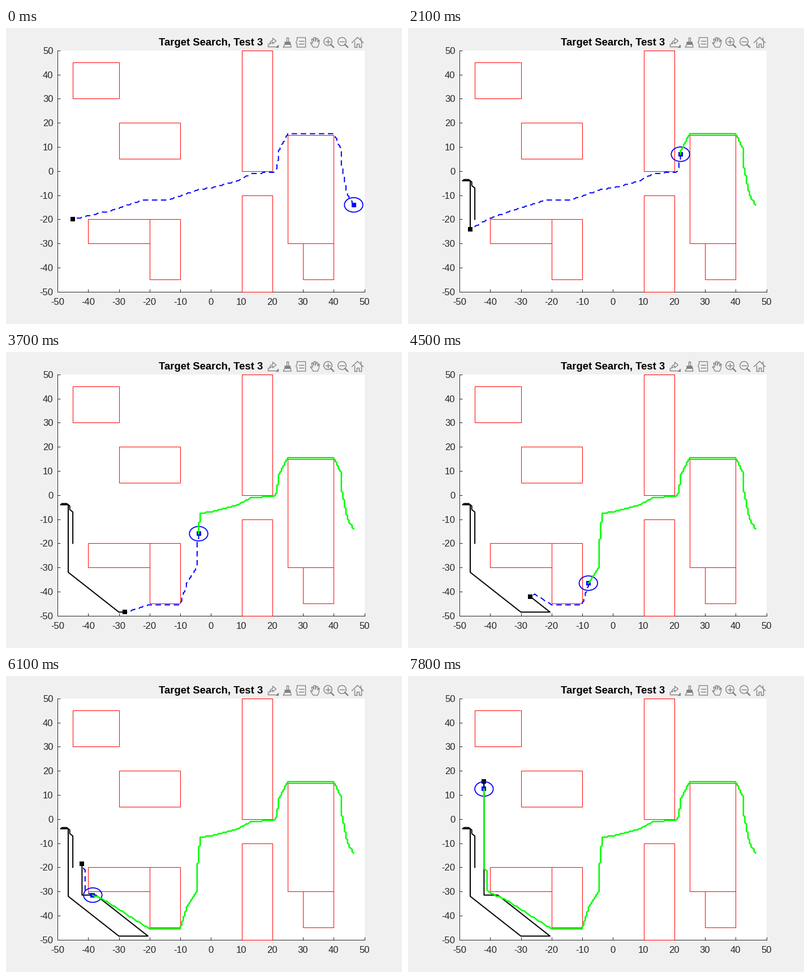
Write a matplotlib script that moves like this. It is 700x525 px and loops after 8.8 s.

```python
import numpy as np
import matplotlib.pyplot as plt
from matplotlib.animation import FuncAnimation
from matplotlib.patches import Circle, Ellipse, Polygon, Rectangle

W, H, DPI = 700, 525, 100
PX = 72 / DPI
FRAMES, LAST = 88, 78
CELL = 0.5
INK, GREY = "#262626", "#808080"

plt.rcParams.update({
    "font.family": "Liberation Sans",
    "font.size": 12,
    "axes.unicode_minus": False,
})

# Obstacles: x, y, width, height
WALLS = [(-45, 30, 15, 15), (-30, 5, 20, 15), (10, 0, 10, 50),
         (10, -50, 10, 40), (25, -30, 15, 45), (30, -45, 10, 15),
         (-40, -30, 20, 10), (-20, -45, 10, 25)]

# Turning points of the pursuer: over the block, through the gap,
# down to the floor and back up the left side
OVER = [(46.5, -14), (44.5, -10), (42.5, 3), (42.5, 9), (40, 15.5),
        (25, 15.5), (22, 8), (21.5, 1)]
GAP = [(20.5, -0.5), (13, -1), (9, -4), (0, -7), (-3.5, -7.5)]
DOWN = [(-4.5, -22), (-4.5, -29.5), (-8, -37), (-10, -45.5), (-20, -45.5)]
BACK = [(-35.5, -33), (-39.5, -31), (-41, -29.5), (-41, -21.5),
        (-42, -20.5), (-42, 12.5)]

# Way on from the gap, as long as the evader is in the west
WEST = [(-14, -12), (-22, -12), (-33, -16.5)]

FLEE = [(-45, -20), (-45, -7), (-46, -6), (-46, -4.5), (-47, -3.5),
        (-48.5, -3.5), (-49, -4), (-46.5, -4), (-46.5, -32), (-30, -48.5),
        (-20.5, -48.5), (-37.5, -31.5), (-42, -31.5), (-42, 15.5)]


def walk(keys):
    """Grid cells along the legs between keys, and the cost to each cell."""
    cells, costs = [np.array(keys[0], float)], [0.0]
    for a, b in zip(keys, keys[1:]):
        delta = np.subtract(b, a)
        low, high = sorted(abs(delta))
        n = max(1, int(np.ceil(high / CELL)))
        start = costs[-1]
        for t in np.arange(1, n + 1) / n:
            cells.append(np.round((a + t * delta) / CELL) * CELL)
            costs.append(start + t * (high + low / 3))
    return np.array(cells), np.array(costs)


class Track:
    """A grid walk at constant pace, finished at the last step."""

    def __init__(self, keys):
        self.cells, self.costs = walk(keys)

    def split(self, step):
        spent = self.costs[-1] * step / LAST
        i = np.argmin(abs(self.costs - spent))
        return self.cells[i], self.cells[:i + 1], self.cells[i + 1:]


hunter = Track(OVER + GAP + DOWN + BACK)
runner = Track(FLEE)


def west_plan(pos, ahead, goal):
    """Through the gap, bent upwards the higher the evader is."""
    gx, gy = goal
    rise = max(0, gy + 20)
    near = [p for p in ahead if p[0] > 20.5]
    far = [(x, y + rise * ((20.5 - x) / 66) ** 1.5)
           for x, y in GAP + WEST if x < pos[0]]
    corners = [(-20, (-40, -19.5)), (-24, (-41, -21)), (-35, (-41, -29.5))]
    return near + far + [c for limit, c in corners if gy < limit]


def south_plan(ahead, goal):
    """Along the route until level with the evader."""
    gx, gy = goal
    return [p for p in ahead
            if p[0] >= -20 or (p[0] > gx + 0.5 and p[1] < gy + 1.5)]


def plan(step, pos, ahead, goal):
    mid = west_plan(pos, ahead, goal) if step < 33 else south_plan(ahead, goal)
    return walk([pos, *mid, goal])[0]


fig = plt.figure(figsize=(W / DPI, H / DPI), dpi=DPI, facecolor="#f0f0f0")
ax = fig.add_axes([0.13, 57.25 / H, 0.775, 0.815])
ax.set(xlim=(-50, 50), ylim=(-50, 50))
ticks = range(-50, 51, 10)
ax.set_xticks(ticks)
ax.set_yticks(ticks)
ax.tick_params(direction="in", length=5 * PX, width=PX, color=INK,
               labelcolor=INK)
ax.tick_params(axis="x", pad=11.5 * PX)
ax.tick_params(axis="y", pad=7.5 * PX)
for side, spine in ax.spines.items():
    spine.set(visible=side in ("left", "bottom"), color=INK, linewidth=PX,
              zorder=1)

for x, y, w, h in WALLS:
    ax.add_patch(Rectangle((x, y), w, h, fill=False, ec="red", lw=PX,
                           zorder=3, clip_on=False))


def line(color, px, z, **kw):
    return ax.plot([], [], color=color, lw=px * PX, zorder=z, **kw)[0]


def square(color, z):
    return line(color, 0, z, marker="s", ms=8 * PX, mew=0)


way = line("blue", 2, 4, ls=(0, (4.8, 3.2)), dash_capstyle="butt")
fled = line("black", 2, 5)
prey = square("black", 6)
chaser = square("blue", 7)
ring = ax.add_patch(Ellipse((0, 0), 6, 6, fill=False, ec="blue",
                            lw=1.8 * PX, zorder=7))
chased = line("lime", 2.6, 8)

# Title and toolbar, in stage pixels
top = fig.add_axes([0, 0, 1, 1])
top.set(xlim=(0, W), ylim=(H, 0))
top.axis("off")
top.text(362.5, 31, "Target Search, Test 3", ha="center", va="baseline",
         weight="bold", size=13.35, color="black")


def stroke(x, *pts, px=1.4):
    xs, ys = np.array(pts).T
    top.plot(xs + x, ys + 25, color=GREY, lw=px * PX,
             solid_joinstyle="round")


def shape(x, *pts, fill=False):
    top.add_patch(Polygon(np.add(pts, (x, 25)), fc=GREY if fill else "none",
                          ec=GREY, lw=1.3 * PX, joinstyle="round"))


def export(x):
    stroke(x, (-9, 3), (-9, 8), (4, 8))
    shape(x, (-6, 4), (-4, -1), (0, -3), (0, -7), (6, -2), (0, 3), (0, 0))
    shape(x, (9, 5), (9, 9), (5, 9), fill=True)


def brush(x):
    shape(x, (-1, -8), (2, -8), (2, 0), (-1, 0))
    shape(x, (-4, 0), (5, 0), (6, 4), (-4, 4), fill=True)
    shape(x, (-4, 4), (-7, 9), (7, 9), (6, 4))


def tip(x):
    shape(x, (-7, -8), (8, -8), (8, 9), (-7, 9), (-7, 3), (-9, 0), (-7, -3))
    for y in (-2, 3):
        stroke(x, (-4, y), (4, y))


def hand(x):
    shape(x, (-3, 9), (-8, 1), (-4, 2), (-6, -5), (-4, -6), (-2, -1),
          (-2, -8), (1, -8), (1, -1), (3, -7), (5, -6), (5, 0), (7, -4),
          (8, -3), (7, 4), (5, 9))


def lens(x, plus=False):
    top.add_patch(Circle((x - 2, 24), 7.2, fill=False, ec=GREY, lw=1.4 * PX))
    stroke(x, (3.3, 4.3), (8, 9), px=2.4)
    stroke(x, (-6, -1), (2, -1))
    if plus:
        stroke(x, (-2, -5), (-2, 3))


def home(x):
    stroke(x, (-10, 1), (0, -8.5), (10, 1))
    stroke(x, (-6, -1), (-6, 9), (-2, 9), (-2, 3), (2, 3), (2, 9), (6, 9),
           (6, -1))
    stroke(x, (5.5, -4), (5.5, -8))


export(471.5)
brush(497)
tip(521.5)
hand(546)
lens(571, plus=True)
lens(596)
home(621.5)


def draw(frame):
    step = min(frame, LAST)
    pos, walked, ahead = hunter.split(step)
    goal, run, _ = runner.split(step)
    way.set_data(*plan(step, pos, ahead, goal).T)
    fled.set_data(*run.T)
    chased.set_data(*walked.T)
    prey.set_data([goal[0]], [goal[1]])
    chaser.set_data([pos[0]], [pos[1]])
    ring.set_center(pos)
    return way, fled, chased, prey, chaser, ring


anim = FuncAnimation(fig, draw, frames=FRAMES, interval=100, repeat=True,
                     repeat_delay=0, blit=False)
plt.show()
```
